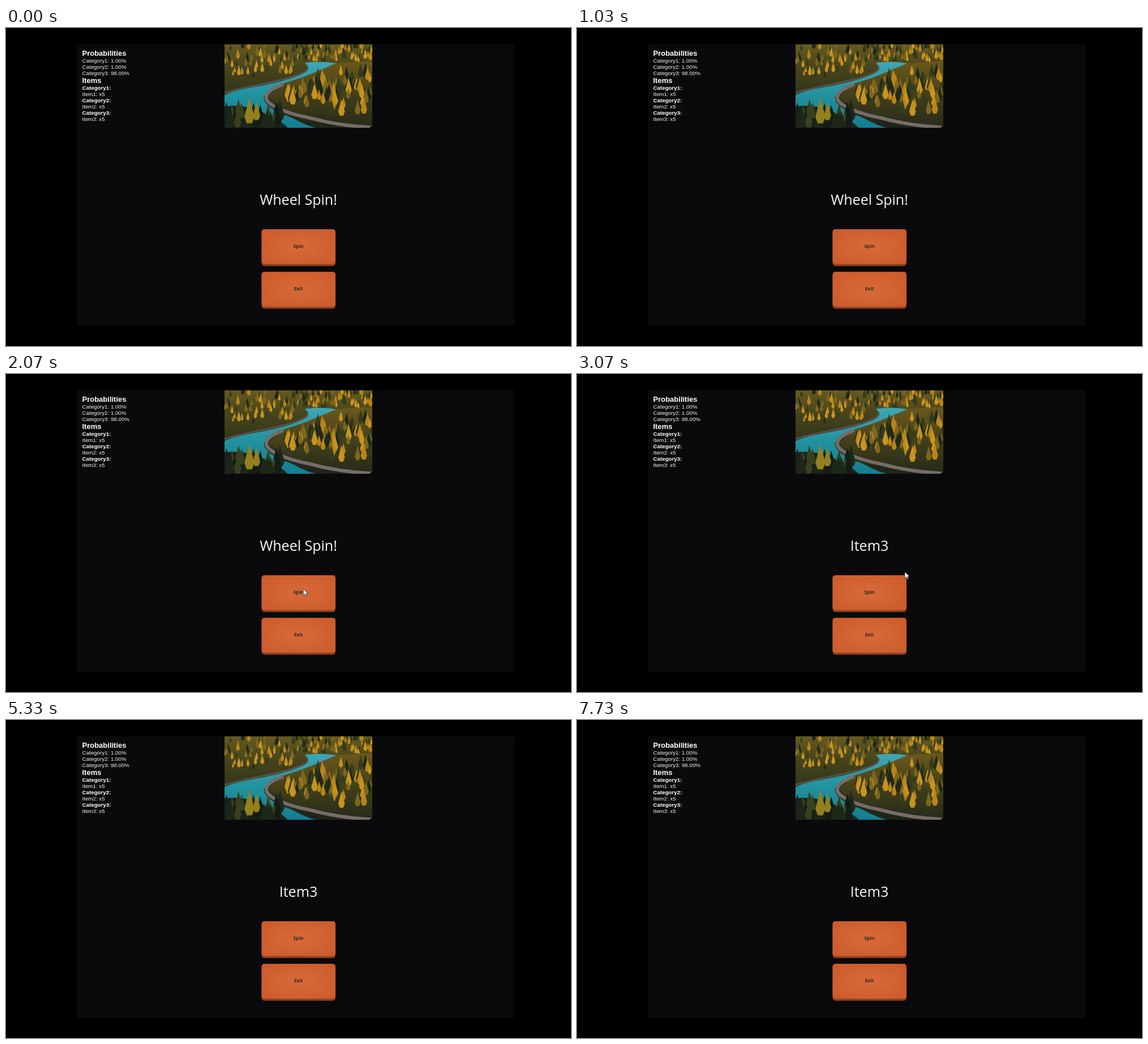
Write an HTML page that moves like this. It is 998 px wide and 561 px high and loops after 8000 ms.

```html
<!DOCTYPE html>
<html lang="en">
<head>
<meta charset="utf-8">
<title>Wheel Spin</title>
<style>
  html, body { margin: 0; width: 100%; height: 100%; overflow: hidden; background: #000; }
  svg { position: absolute; left: 0; top: 0; display: block; }
  .info { font: 9.75px "Liberation Sans", Arial, sans-serif; fill: #f4f4f4; }
  .info .head { font-size: 13px; font-weight: bold; fill: #fff; }
  .info .bold { font-weight: bold; fill: #fff; }
  .result { font: 25px "Open Sans", "Noto Sans", sans-serif; fill: #f7f7f5; text-anchor: middle; }
  .label { font: bold 8.4px "Open Sans", "Noto Sans", sans-serif; fill: #2f2a26; text-anchor: middle; }
</style>
</head>
<body>
<svg width="998" height="561" viewBox="0 0 998 561">
  <defs>
    <linearGradient id="forest" x2="0" y2="1">
      <stop offset="0" stop-color="#665a20"/>
      <stop offset=".3" stop-color="#45431c"/>
      <stop offset="1" stop-color="#1c2418"/>
    </linearGradient>
    <linearGradient id="land" x2="0" y2="1">
      <stop offset="0" stop-color="#6b581c"/>
      <stop offset=".6" stop-color="#3d3b1a"/>
      <stop offset="1" stop-color="#262a18"/>
    </linearGradient>
    <linearGradient id="water" x2="0" y2="1">
      <stop offset="0" stop-color="#3fa6b4"/>
      <stop offset=".5" stop-color="#22929f"/>
      <stop offset="1" stop-color="#147d91"/>
    </linearGradient>
    <radialGradient id="face" r=".75">
      <stop offset="0" stop-color="#d86a38"/>
      <stop offset="1" stop-color="#cb592b"/>
    </radialGradient>
    <clipPath id="crop"><path d="M0 0H261V143L256 147.5H0Z"/></clipPath>
    <g id="button">
      <rect width="130.5" height="65" rx="5" fill="#8f3f1c"/>
      <rect width="130.5" height="61.5" rx="5" fill="url(#face)"/>
    </g>
  </defs>

  <rect x="125" y="28.5" width="773" height="496.5" fill="#0a0a0c"/>

  <g transform="translate(386 28.5)" clip-path="url(#crop)">
    <rect width="261" height="148" fill="url(#forest)"/>
    <g id="far"></g>
    <path fill="url(#water)" d="M0 90C20 78 70 75 108 63C130 57 150 48 148 40L142 33C155 31 180 30 198 34C180 42 165 50 150 58C120 66 85 80 70 92C66 105 90 120 115 128C135 138 150 146 165 148H95C80 130 55 120 20 118L0 115Z"/>
    <path fill="none" stroke="#59514e" stroke-width="3" d="M0 86C40 74 70 71 108 61C130 55 150 48 146 41"/>
    <path fill="url(#land)" d="M200 33C170 44 150 56 105 69L78 92C90 112 130 124 170 130L261 148V30Z"/>
    <path fill="none" stroke="#776b68" stroke-width="6" d="M104 71C84 78 72 87 74 97C80 111 115 123 150 130C180 138 220 145 261 147"/>
    <path fill="#1b241b" d="M0 110C25 106 55 112 74 124C90 130 105 140 112 148H0Z"/>
    <g id="near"></g>
  </g>

  <g class="info" id="info"></g>
  <text class="result" id="result" x="516.5" y="312"></text>

  <use href="#button" x="451.5" y="355"/>
  <use href="#button" x="451.5" y="430.3"/>
  <text class="label" x="516.5" y="388">Spin</text>
  <text class="label" x="516.5" y="463">Exit</text>

  <path id="cursor" d="M0 0V11.6L2.7 9.1L4.5 13.2L6.4 12.4L4.6 8.4H8.3Z" fill="#fff" stroke="#111" stroke-width=".7"/>
</svg>
<script>
const LOOP = 8000;
const $ = id => document.getElementById(id);

function add(parent, tag, attrs, text) {
  const el = document.createElementNS("http://www.w3.org/2000/svg", tag);
  for (const k in attrs) el.setAttribute(k, attrs[k]);
  if (text) el.textContent = text;
  parent.appendChild(el);
}

// Side panel: text, baseline, style
[
  ["Probabilities", 49, "head"],
  ["Category1: 1.00%", 61],
  ["Category2: 1.00%", 72],
  ["Category3: 98.00%", 83],
  ["Items", 97, "head"],
  ["Category1:", 109, "bold"],
  ["Item1: x5", 120],
  ["Category2:", 131, "bold"],
  ["Item2: x5", 142],
  ["Category3:", 153, "bold"],
  ["Item3: x5", 164]
].forEach(([text, y, cls]) => add($("info"), "text", { x: 134.5, y, class: cls || "" }, text));

// Flat trees
let seed = 11;
function rnd() {
  seed = (seed * 16807) % 2147483647;
  return seed / 2147483647;
}
const GOLD = ["#b98519", "#c7941f", "#7d661d", "#353c1b", "#20291a"];
const DARK = ["#18221a", "#1d2718", "#39401d", "#141c17"];

function grove(id, count, x0, x1, top, bottom, size, colors) {
  const trees = Array.from({ length: count }, (_, i) => {
    const x = x0 + (x1 - x0) * (i + rnd()) / count;
    const y = top(x) + rnd() * (bottom(x) - top(x));
    return { x, y, h: size * (.7 + rnd() * .6), fill: colors[Math.floor(rnd() * colors.length)] };
  });
  trees.sort((a, b) => a.y - b.y);
  for (const { x, y, h, fill } of trees) {
    const w = h * .2;
    add($(id), "path", { d: `M${x} ${y - h}L${x + w} ${y - h * .25}L${x + w * .5} ${y}H${x - w * .5}L${x - w} ${y - h * .25}Z`, fill });
  }
}
grove("far", 110, 0, 261, () => 6, x => x < 130 ? 70 - x * .15 : 32, 14, GOLD);
grove("near", 80, 108, 261, x => Math.max(52, 92 - (x - 108) * .5), x => 104 + (x - 108) * .25, 23, GOLD);
grove("near", 26, 0, 104, () => 126, () => 154, 30, DARK);
grove("near", 2, 42, 60, () => 122, () => 142, 40, ["#94801f"]);

// The wheel steps through the three items, slowing down
const steps = [2370, 2470, 2580, 2700, 2830, 2970, 3120, 3290, 3480, 3690, 3990, 4250, 4540, 4870, 5230];

function resultAt(t) {
  const n = steps.filter(s => s <= t).length;
  return n ? "Item" + ((n - 1) % 3 + 1) : "Wheel Spin!";
}

// Pointer: time, x, y
const path = [
  [1730, 548, 498],
  [2000, 525, 379],
  [2480, 525, 379],
  [3070, 579, 349],
  [3330, 890, 262]
];

function pointerAt(t) {
  const i = path.findIndex(p => p[0] > t);
  if (i < 1) return null;
  const [t0, x0, y0] = path[i - 1], [t1, x1, y1] = path[i];
  const u = (t - t0) / (t1 - t0);
  const e = i === path.length - 1 ? u * u : u * u * (3 - 2 * u);
  return [x0 + (x1 - x0) * e, y0 + (y1 - y0) * e];
}

function draw(t) {
  const text = resultAt(t);
  if ($("result").textContent !== text) $("result").textContent = text;
  const p = pointerAt(t);
  $("cursor").style.display = p ? "" : "none";
  if (p) $("cursor").setAttribute("transform", `translate(${p[0]} ${p[1]})`);
}

const start = performance.now();
function tick() {
  draw((performance.now() - start) % LOOP);
  requestAnimationFrame(tick);
}
tick();
</script>
</body>
</html>
```
